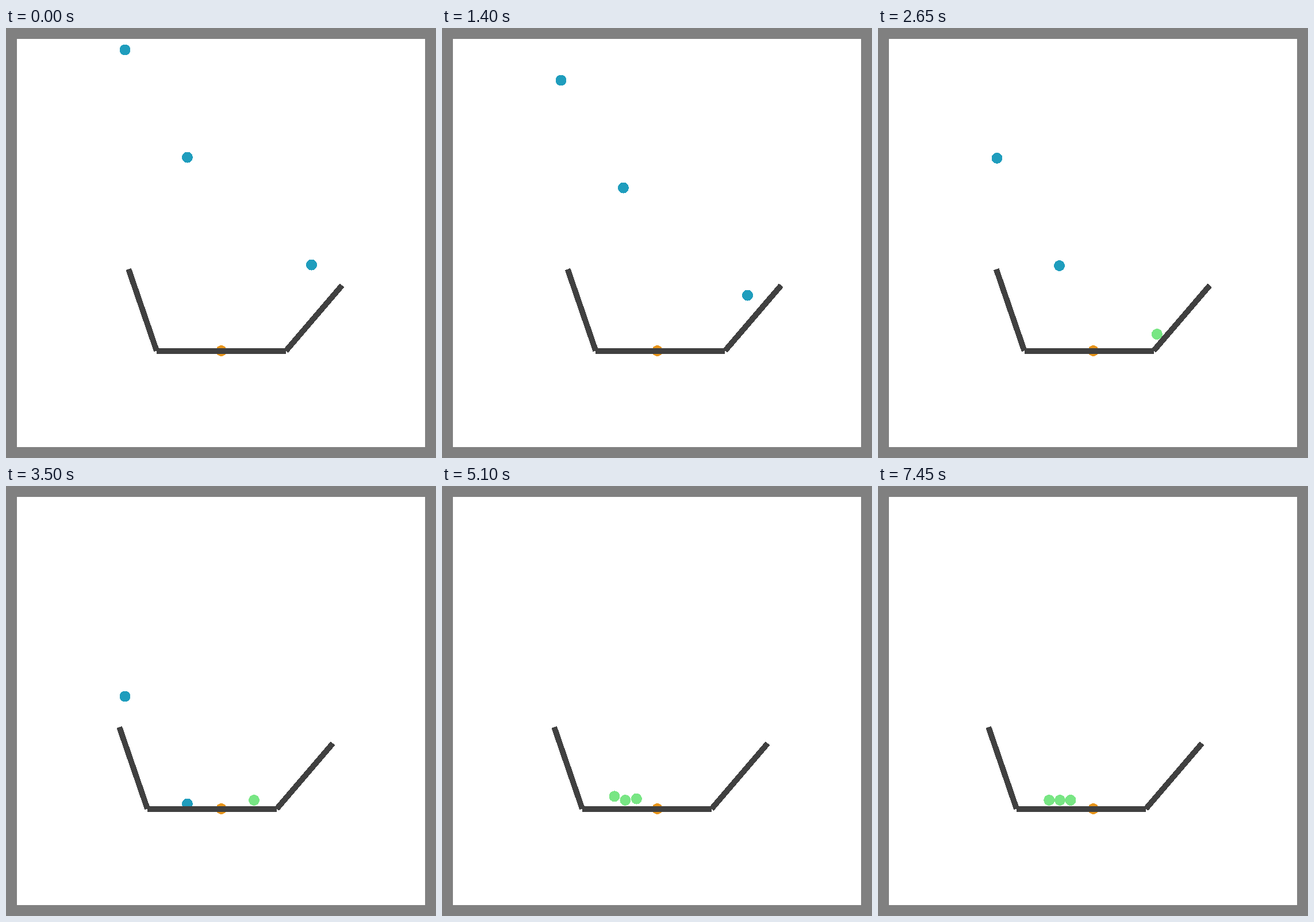
Recreate the animation shown at these times as an HTML page. Size 748 by 748 pixels, loop 7.5 s.

```html
<!DOCTYPE html>
<html>
<head>
<meta charset="utf-8">
<style>
  html, body { margin: 0; height: 100%; overflow: hidden; background: #fff; }
  svg { display: block; width: 748px; height: 748px; }
</style>
</head>
<body>
<svg viewBox="0 0 748 748" shape-rendering="crispEdges">
  <rect x="9.35" y="9.35" width="729.3" height="729.3" fill="#fff" stroke="#808080" stroke-width="18.7"/>
  <circle cx="374.5" cy="561.5" r="9.4" fill="#e8951a"/>
  <g id="balls">
    <circle r="9.5"/>
    <circle r="9.5"/>
    <circle r="9.5"/>
  </g>
  <g id="tray" stroke="#404040" stroke-width="10" fill="none">
    <path d="M262 561.5H487M262 561.5L213.2 419.5M487 561.5L584.6 447.7"/>
  </g>
</svg>
<script>
const STEP = 50, STEPS = 150, FLOOR = 546.5, GRAVITY = 0.133;
const BLUE = '#1f9dbd', GREEN = '#78e684';
const balls = document.querySelectorAll('#balls circle');
const tray = document.getElementById('tray');

const fall = n => 0.031 * n + GRAVITY * n * n / 2;

// Piecewise linear path through [step, value] points
function along(n, points) {
  const i = points.findIndex(p => p[0] >= n);
  if (i < 0) return points[points.length - 1][1];
  if (i === 0) return points[0][1];
  const [a, u] = points[i - 1], [b, v] = points[i];
  return u + (v - u) * (n - a) / (b - a);
}

// Ballistic hop off the floor
const hop = (n, start, speed) => {
  const m = Math.max(0, n - start);
  return FLOOR - Math.max(0, speed * m - GRAVITY * m * m / 2);
};

function trayShift(n) {
  if (n <= 35) return 5.6 * (1 - Math.exp(-n / 9));
  if (n <= 70) {
    const m = n - 35;
    return 5.5 - 0.836 * m + 0.00635 * m * m;
  }
  return -16 - 0.063 * (n - 70);
}

function leftBall(n) {
  if (n <= 75) return [207, 38 + fall(n)];
  const m = n - 75;
  if (n <= 94) return [207 + 4.07 * m, Math.min(FLOOR, 414.4 + 5.43 * m + GRAVITY * m * m / 2)];
  return [
    along(n, [[94, 284.3], [97.4, 296.8], [101, 300], [120, 299.5], [124, 298.5], [136, 297.7]]),
    hop(n, 97.4, 1.74)
  ];
}

function middleBall(n) {
  return [
    along(n, [[97.4, 315.5], [100, 319], [120, 317.5], [137, 316.5]]),
    n <= 70 ? 225 + fall(n) : FLOOR
  ];
}

function rightBall(n) {
  if (n <= 35) return [531.5, 412 + fall(n)];
  if (n <= 58) {
    const m = n - 35, x = 531.5 - 2.02 * m - 0.03 * m * m;
    const rampY = 561.5 - (x - 487 - trayShift(n)) * 1.166;
    return [x, Math.min(FLOOR, rampY - 22)];
  }
  return [
    along(n, [[58, 469.2], [70, 431.5], [89, 372.5], [100, 338.2], [120, 340], [139, 335]]),
    hop(n, 100, 1.3)
  ];
}

const actors = [[leftBall, 75], [middleBall, 70], [rightBall, 35]];

function draw(now) {
  const n = Math.floor(now / STEP) % STEPS;
  tray.setAttribute('transform', `translate(${trayShift(n)} 0)`);
  actors.forEach(([place, contact], i) => {
    const [x, y] = place(n);
    balls[i].setAttribute('cx', x);
    balls[i].setAttribute('cy', y);
    balls[i].setAttribute('fill', n > contact ? GREEN : BLUE);
  });
}

const start = performance.now();
function tick() {
  draw(performance.now() - start);
  requestAnimationFrame(tick);
}
tick();
</script>
</body>
</html>
```
